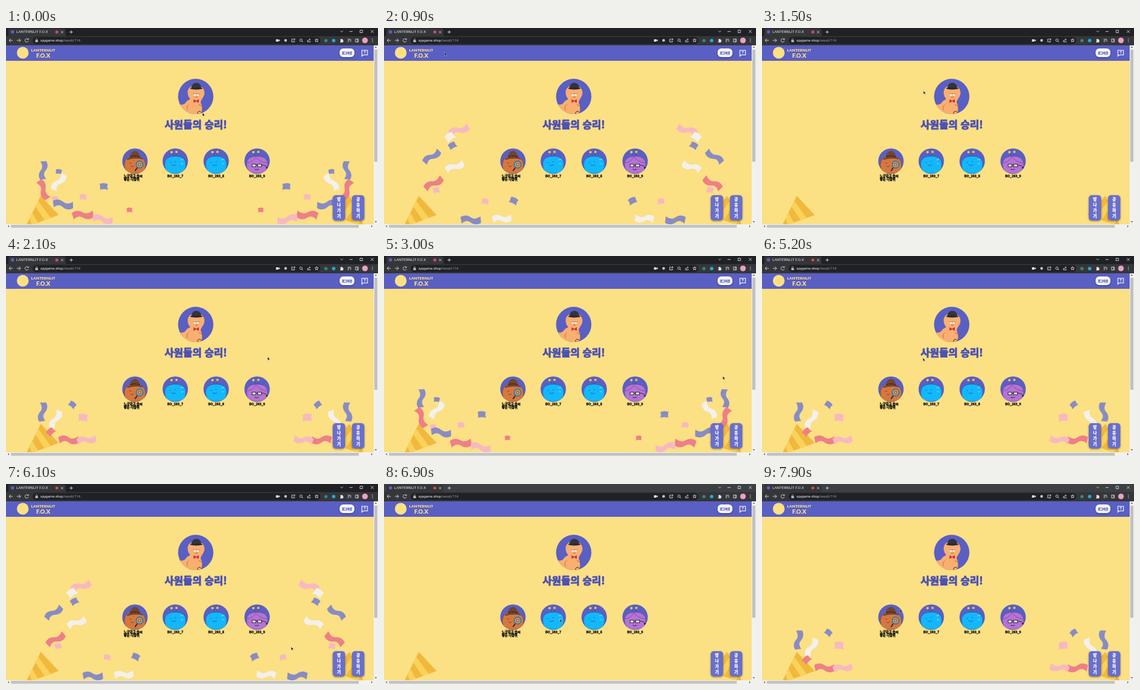
An HTML page that plays this animation: 600x323 px, repeating every 8000 ms.

```html
<!DOCTYPE html>
<html lang="ko">
<head>
<meta charset="utf-8">
<title>Result</title>
<style>
  html, body { margin: 0; width: 100%; height: 100%; overflow: hidden; background: #fbe084; }
  svg { display: block; width: 600px; height: 323px; }
  text { font-family: "Noto Sans CJK KR", "Noto Sans CJK", "Noto Sans", sans-serif; }
  .ui { font-family: Roboto, "Liberation Sans", sans-serif; }
  .logo { font-family: Lato, "Open Sans", sans-serif; font-weight: 900; fill: #fbe084; text-anchor: middle; }
  .mid { text-anchor: middle; }
  .heavy { font-weight: 900; stroke-linejoin: round; }
  .title { font-size: 16.3px; fill: #4b50b5; stroke: #4b50b5; stroke-width: .9; }
  .name { font-size: 5.2px; fill: #100e0b; stroke: #100e0b; stroke-width: .35; }
  .login { font-size: 4.5px; fill: #4b50b5; stroke: #4b50b5; stroke-width: .25; }
  .icon { fill: none; stroke: #d6d8db; stroke-width: .9; }
  .btn rect { fill: #6a6fca; filter: drop-shadow(0 1.5px 1.5px #0006); }
  .btn text { font-size: 6.5px; fill: #fff; stroke: #fff; stroke-width: .3; text-anchor: middle; }
</style>
</head>
<body>
<svg viewBox="0 0 600 323" xmlns="http://www.w3.org/2000/svg">
  <defs>
    <clipPath id="page"><path d="M0 53H593V317H0Z"/></clipPath>
    <clipPath id="big"><circle r="28.5"/></clipPath>
    <clipPath id="small"><circle r="20.5"/></clipPath>
    <path id="ribbon" d="M-17-3C-11-8-5-7 0-4S10-3 15-7L17 3C11 8 5 7 0 4S-9 2-14 7Z"/>
    <path id="curl" d="M-7-3Q-1-7 6-5Q5 0 8 4Q1 3-5 6Q-5 1-7-3Z"/>
    <g id="bug">
      <path d="M-2-8Q-4-13-6-14M1-8Q2-13 2-14" fill="none" stroke="#39409a" stroke-width=".6"/>
      <circle cx="-6" cy="-14.5" r="1.9" fill="#f8ca3e"/>
      <circle cx="2" cy="-14.9" r="1.9" fill="#f8ca3e"/>
      <path d="M-17 7C-18-5-9-8 0-8S18-5 17 7C16 18 9 20 0 20S-16 18-17 7Z" stroke="#283a80" stroke-width=".5"/>
    </g>
    <g id="smile" fill="none" stroke="#163d70" stroke-width=".6">
      <path d="M-9 2l2 .5M-1 1l2-.5M-6 6Q-3 8.5 1 6"/>
      <path d="M8-2l5-1M9 4l4 .5" stroke="#c9f2ff"/>
    </g>
  </defs>

  <!-- page -->
  <rect y="27" width="600" height="296" fill="#fbe084"/>
  <g clip-path="url(#page)">
    <g id="party">
      <g id="cone"></g>
      <g id="burst"></g>
    </g>
    <use href="#party" transform="translate(610) scale(-1 1)"/>
  </g>

  <g transform="translate(306 110.6)">
    <circle r="28.5" fill="#5a5fc3"/>
    <g clip-path="url(#big)">
      <path d="M-13-7C-13-15-5-19 2-18C10-18 15-11 14-4C13 2 8 5 8 10C10 15 12 20 9 26C5 33-6 32-12 29H-29V14C-25 12-20 15-16 10C-14 6-10 6-9 4C-12 1-13-3-13-7Z" fill="#f9af70"/>
      <path d="M-11 13Q-16 17-13 22M5 13q8 3 5 9" fill="none" stroke="#a85f38" stroke-width=".8"/>
      <path d="M-7-13C-7-25 9-25 9-13Z" fill="#34343b"/>
      <ellipse cx="1" cy="-13" rx="10" ry="1.8" fill="#2b2a30"/>
      <circle cx="-1.5" cy="-3" r="2" fill="#fff"/>
      <circle cx="3.3" cy="-3" r="2" fill="#fff"/>
      <path d="M-4-4.2H6" stroke="#875a3d" stroke-width=".8"/>
      <path d="M-1 1Q1 2 3 1" fill="none" stroke="#8d4930" stroke-width=".7"/>
      <path d="M-3.5 4.5L.7 7L5 4.5V10.5L.7 8L-3.5 10.5Z" fill="#d32c37"/>
      <path d="M3 28a3 3 0 0 1 6-2" fill="none" stroke="#46362f"/>
    </g>
  </g>
  <text class="heavy title mid" x="306" y="162">사원들의 승리!</text>

  <g transform="translate(208 215)">
    <circle r="20.5" fill="#5a5fc3"/>
    <g clip-path="url(#small)">
      <path d="M-17 8C-18-5-9-9 0-8S18-4 17 8C16 19 9 20 0 20S-16 19-17 8Z" fill="#d6773f" stroke="#59301c" stroke-width=".5"/>
      <path d="M-8-6C-7-20 7-20 8-6Q14-5 12-3Q0-6-12-2Q-15-4-8-6Z" fill="#71452a"/>
      <path d="M-8-7Q0-10 8-7" fill="none" stroke="#351f16" stroke-width="1.2"/>
      <path d="M-9 3l3 .6M-7 8q2 2 5 0" fill="none" stroke="#59301c" stroke-width=".7"/>
      <path d="M4 10L0 16" stroke="#30303a" stroke-width="2"/>
      <circle cx="7.5" cy="5.5" r="5.5" fill="#d79a6c" stroke="#2b7fa8" stroke-width="1.9"/>
      <circle cx="7.5" cy="5.5" r="2.3" fill="none" stroke="#59301c" stroke-width=".7"/>
    </g>
  </g>
  <g transform="translate(273 215)">
    <circle r="20.5" fill="#5a5fc3"/>
    <g clip-path="url(#small)"><use href="#bug" fill="#13b7fb"/><use href="#smile"/></g>
  </g>
  <g transform="translate(339 215)">
    <circle r="20.5" fill="#5a5fc3"/>
    <g clip-path="url(#small)"><use href="#bug" fill="#13b7fb"/><use href="#smile"/></g>
  </g>
  <g transform="translate(405 215)">
    <circle r="20.5" fill="#5a5fc3"/>
    <g clip-path="url(#small)">
      <use href="#bug" fill="#b573d4"/>
      <path d="M-16 3Q-6 1-2-7Q5 2 16 3" fill="none" stroke="#8448a7" stroke-width=".9"/>
      <path d="M-8 5H-2V9H-8ZM1 5H7V9H1Z" fill="#fff" stroke="#282338" stroke-width="1.1"/>
      <path d="M-2 6.5H1M7 6L15 8M-4 13Q-1 15 3 13" fill="none" stroke="#282338" stroke-width=".9"/>
    </g>
    <circle cx="15.5" cy="10.5" r="1.5" fill="#30293a"/>
  </g>
  <text class="heavy name" x="190" y="241.4">느긋하고 솜씨<tspan x="190" dy="4.6">좋은 다람쥐</tspan></text>
  <text class="heavy name mid" x="273" y="241.4">BO_263_7</text>
  <text class="heavy name mid" x="339" y="241.4">BO_263_8</text>
  <text class="heavy name mid" x="405" y="241.4">BO_263_9</text>

  <g id="buttons"></g>

  <!-- site header -->
  <rect y="28" width="593" height="25" fill="#5a5fc3"/>
  <circle cx="27" cy="40" r="9.5" fill="#fbe084"/>
  <text class="logo" x="60" y="38.2" font-size="6.4">LANTERNLIT</text>
  <text class="logo" x="60" y="47.5" font-size="9.3">F.O.X</text>
  <rect x="538" y="33" width="24" height="14" rx="6" fill="#f4f4fa" style="filter:drop-shadow(0 1px 1px #0006)"/>
  <text class="heavy login mid" x="550" y="41.7">로그아웃</text>
  <path d="M574 36H583V43.5H576L574 45.5Z" fill="none" stroke="#fff" stroke-width="1.1"/>
  <text class="ui mid" x="578.5" y="42.3" font-size="6.5" font-weight="700" fill="#fff">?</text>

  <!-- scrollbars -->
  <path d="M593 28H600V323H0V317H593Z" fill="#f1f1f1"/>
  <rect id="thumb" x="594" y="35" width="5" height="181" fill="#c1c1c1"/>
  <rect x="8" y="318" width="561" height="4.5" fill="#c1c1c1"/>
  <path d="M594.8 32L596.5 29.5L598.2 32ZM594.8 312L596.5 314.5L598.2 312ZM5 318.6L2.5 320.2L5 321.8ZM589 318.6L591.5 320.2L589 321.8Z" fill="#666"/>

  <!-- browser -->
  <rect id="strip" width="600" height="14" fill="#202124"/>
  <path d="M1 13.5Q4 13 4 10V3Q4 1 6 1H93Q96 1 96 4V10Q96 13 99 13.5Z" fill="#35363a"/>
  <rect y="13" width="600" height="15" fill="#35363a"/>
  <circle cx="10.5" cy="6.3" r="2.7" fill="#5a5fc3"/>
  <text class="ui" x="16.5" y="8.2" font-size="6.2" fill="#e5e7ea">LANTERNLIT F.O.X</text>
  <circle id="rec" cx="82" cy="6.5" r="2.2" stroke-width="1"/>
  <path class="icon" d="M88.7 4.8l3.6 3.6m0-3.6l-3.6 3.6M102.5 6.5h5.4m-2.7-2.7v5.4M539.5 4.6l2 2 2-2M554 5.7h5M571 3.6h4v4h-4ZM588.5 3.4l4.4 4.4m0-4.4l-4.4 4.4"/>
  <path class="icon" d="M11 20H5m2.7-2.8L5 20l2.7 2.8M17.5 20h6m-2.7-2.8l2.7 2.8-2.7 2.8M35.7 18.3a2.8 2.8 0 1 0 .4 2.7M36.2 16.8v2h-2"/>
  <rect x="43" y="14.6" width="464" height="11.4" rx="5.7" fill="#202124"/>
  <path d="M47.3 19.4h4.2v3.4h-4.2Z" fill="#bfc2c6"/>
  <path d="M48.2 19.5v-1.1a1.2 1.2 0 0 1 2.4 0v1.1" fill="none" stroke="#bfc2c6" stroke-width=".7"/>
  <text class="ui" x="55.5" y="22.4" font-size="5.6" fill="#f0f1f3">spygame.shop<tspan fill="#9aa0a6">/result/114</tspan></text>
  <path d="M435.5 18.3h4v3.6h-4ZM439.8 19.6l1.8-1v3l-1.8-1Z" fill="#eceef0"/>
  <circle cx="451" cy="20" r="2.2" fill="#c0c2ca"/>
  <path class="icon" d="M463 17.9h-2.2v4.6h4.5v-2.2M464 17.5h1.8v1.8M465.7 17.6l-2.8 2.8M477.3 21.3l1.7 1.7M486.3 19.6v2.8h4.5v-1.2M487.5 20.8q.3-2.3 3-2.3M489.4 17.2l1.5 1.3-1.5 1.3"/>
  <circle class="icon" cx="475.8" cy="19.7" r="2"/>
  <path class="icon" d="M501 17l.8 1.9 2 .2-1.5 1.3.5 2-1.8-1.1-1.8 1.1.5-2-1.5-1.3 2-.2Z"/>
  <circle cx="516" cy="20.3" r="2.6" fill="#35877f"/>
  <circle cx="528.5" cy="20.3" r="2.8" fill="#27a8d2"/>
  <path d="M539 18.5h1.2a1.1 1.1 0 0 1 2.2 0h1.2v1.4a1.1 1.1 0 0 1 0 2.1v1.2H539v-1.5a1 1 0 0 0 0-2Z" fill="#e4e6e9"/>
  <path class="icon" d="M551 18.2h5M551 20.2h3M551 22.2h2M556 18.4v4M563.7 17.8h4.6v4.8h-4.6ZM566.8 18v4.5"/>
  <circle cx="579" cy="20" r="4.6" fill="#eda0c4"/>
  <g fill="#d6d8db"><circle cx="591" cy="17.8" r=".7"/><circle cx="591" cy="20.2" r=".7"/><circle cx="591" cy="22.6" r=".7"/></g>

  <path id="cursor" d="M0 0V5.3L1.3 4.2L2.2 6.1L3 5.7L2.2 3.9H3.8Z" fill="#111" stroke="#fff" stroke-width=".35"/>
</svg>

<script>
const LOOP = 8000, POSE = 700, POSE_START = 330;
const NS = 'http://www.w3.org/2000/svg';
const $ = id => document.getElementById(id);
const color = { b: '#898cc3', w: '#f4f0ed', p: '#f7b9c0', r: '#ee7f87' };

// Each piece: shape, color, x, y, angle, scale
const poses = {
  spread: [
    'ribbon p 121 165 -16 1', 'curl w 106 176 -25 1.15', 'curl b 110 190 -20 .95',
    'ribbon b 77 208 -32 .95', 'ribbon w 114 224 -18 .95', 'ribbon r 80 251 -28 1',
    'curl p 84 262 0 .85', 'curl p 163 280 20 .85', 'curl b 209 279 35 1',
    'ribbon b 140 310 5 1', 'ribbon w 190 308 0 .95'],
  empty: [],
  launch: [
    'ribbon b 59 252 -80 .95', 'ribbon w 80 264 -60 .95', 'curl b 107 240 48 .9',
    'curl p 124 261 14 1.15', 'curl r 72 284 -35 1', 'ribbon r 101 297 5 1',
    'ribbon p 130 297 -5 .95'],
  rise: [
    'ribbon b 60 230 -82 .92', 'curl b 85 232 15 .75', 'ribbon w 85 249 -50 .95',
    'ribbon r 60 261 70 1', 'curl p 79 276 0 .8', 'ribbon b 92 285 10 1',
    'curl p 124 273 8 .85', 'curl b 157.5 256 10 1', 'ribbon r 124 302 0 1.05',
    'ribbon p 156 309 12 1', 'curl r 199 294 10 .7']
};

function drawCone() {
  const [ax, ay, bx, by, cx, cy] = [56, 271, 85, 302, 31, 322];
  const edge = (x, y, k) => `${x + (cx - x) * k} ${y + (cy - y) * k}`;
  const band = (k, m) =>
    `M${edge(ax, ay, k)}L${edge(bx, by, k + .08)}L${edge(bx, by, m + .08)}L${edge(ax, ay, m)}Z`;
  return `<path d="M${ax} ${ay}L${bx} ${by}L${cx} ${cy}Z" fill="#f0b93e"/>` +
    `<path d="${band(.16, .34)}${band(.54, .72)}" fill="#f9d25a"/>`;
}

function drawBit(bit) {
  const [shape, c, x, y, turn, size] = bit.split(' ');
  return `<use href="#${shape}" fill="${color[c]}" transform="translate(${x} ${y}) rotate(${turn}) scale(${size})"/>`;
}

$('cone').innerHTML = drawCone();
const layers = Object.values(poses).map(bits => {
  const g = document.createElementNS(NS, 'g');
  g.innerHTML = bits.map(drawBit).join('');
  $('burst').append(g);
  return g;
});

$('buttons').innerHTML = [[527, '방나가기'], [558, '공유하기']].map(([x, label]) =>
  `<g class="btn"><rect x="${x}" y="270" width="20" height="41" rx="5"/>` +
  [...label].map((ch, i) => `<text class="heavy" x="${x + 10}" y="${279.3 + i * 9}">${ch}</text>`).join('') + '</g>'
).join('');

// Pointer stops: time, x, y
const stops = [
  [0, 317, 137], [900, 98, 39.5], [2100, 422, 163], [3500, 597.5, 207], [4200, 597.5, 207],
  [5200, 259.5, 164.5], [6100, 460, 263], [7300, 222.5, 202.5], [8000, 222.5, 202.5]
];

function pointer(t) {
  const i = stops.findIndex(s => t < s[0]);
  const [t0, x0, y0] = stops[i - 1], [t1, x1, y1] = stops[i];
  const k = (t - t0) / (t1 - t0), e = k * k * (3 - 2 * k);
  return [x0 + (x1 - x0) * e, y0 + (y1 - y0) * e];
}

function render(now) {
  const t = now % LOOP;
  const cycle = POSE * layers.length;
  const pose = Math.floor(((t - POSE_START + cycle) % cycle) / POSE);
  layers.forEach((g, i) => g.setAttribute('display', i === pose ? 'inline' : 'none'));

  const [x, y] = pointer(t);
  $('cursor').setAttribute('transform', `translate(${x} ${y})`);
  $('thumb').setAttribute('fill', x > 593 ? '#a8a8a8' : '#c1c1c1');
  $('strip').setAttribute('fill', t < 6900 ? '#202124' : '#3c4043');
  $('rec').setAttribute('fill', t < 4550 ? '#e04468' : '#e4573d');
  $('rec').setAttribute('stroke', t < 4550 ? '#a4506a' : '#93483d');
  requestAnimationFrame(render);
}
requestAnimationFrame(render);
</script>
</body>
</html>
```
